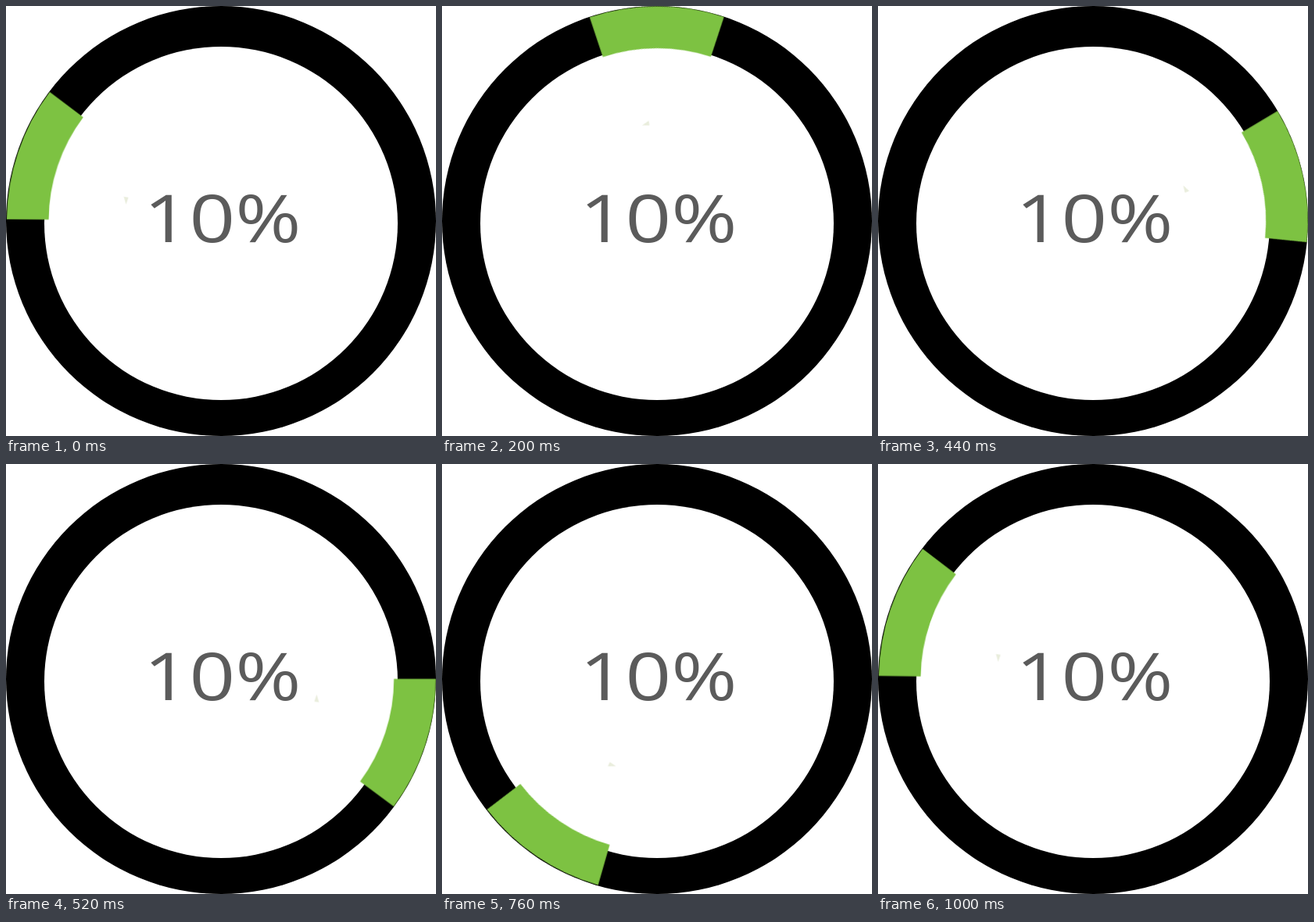
An HTML page without scripts for the animation above (1040 ms loop, 550x550 px).

```html
<!DOCTYPE html>
<html lang="en">
<head>
<meta charset="utf-8">
<title>Progress ring</title>
<style>
  html, body { margin: 0; width: 100%; height: 100%; overflow: hidden; background: #fff; }
  svg { display: block; width: 100vw; height: 100vh; }

  .label { font: 84px "Open Sans", "Noto Sans", sans-serif; fill: #5b5b5b; }

  .spinner {
    transform-origin: 275.4px 274.8px;
    animation: spin 1040ms infinite;
  }

  /* One step per 40 ms tick; the pace changes around the ring. */
  @keyframes spin {
    0%       { transform: rotate(.4deg);    animation-timing-function: steps(5, end); }
    19.2308% { transform: rotate(71.6deg);  animation-timing-function: steps(4, end); }
    34.6154% { transform: rotate(118.4deg); animation-timing-function: steps(4, end); }
    50%      { transform: rotate(180deg);   animation-timing-function: steps(3, end); }
    61.5385% { transform: rotate(241.6deg); animation-timing-function: steps(5, end); }
    80.7692% { transform: rotate(315.6deg); animation-timing-function: steps(4, end); }
    96.1538%, 100% { transform: rotate(360.8deg); }
  }
</style>
</head>
<body>
<svg viewBox="0 0 550 550">
  <circle cx="275" cy="275" r="275"/>
  <circle cx="275" cy="278" r="226" fill="#fff"/>

  <g class="spinner">
    <!-- 36.5 degree band, radii 220.8 and 274.4, starting at the left -->
    <g transform="translate(275.4 274.8)">
      <path fill="#7dc242" d="M-274.4 0A274.4 274.4 0 0 1 -220.6 -163.2L-177.5 -131.3A220.8 220.8 0 0 0 -220.8 0Z"/>
      <path fill="#dfe5cd" opacity=".7" d="M-125 -30l6 1l-3 9z"/>
    </g>
  </g>

  <text class="label" transform="translate(176 302) scale(1.22 1)">10%</text>
</svg>
</body>
</html>
```
